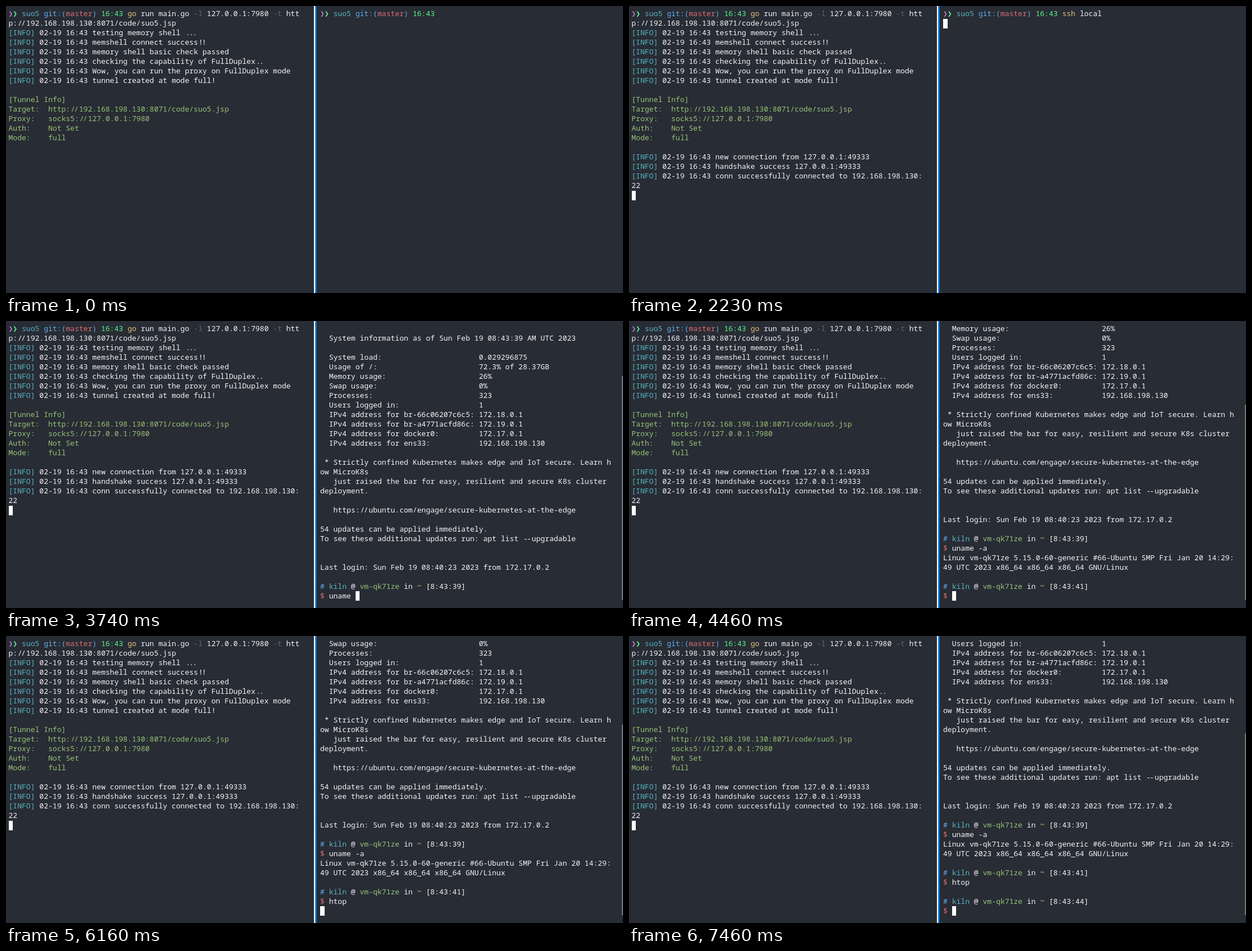
An HTML page with a canvas for the animation above (8000 ms loop, 1096 px wide and 511 px high).

```html
<!DOCTYPE html>
<html lang="en">
<head>
<meta charset="utf-8">
<title>Terminal tunnel</title>
<style>
  html, body { margin: 0; width: 100%; height: 100%; overflow: hidden; background: #282c34; }
  canvas { display: block; }
</style>
</head>
<body>
<canvas id="stage" width="1096" height="511"></canvas>
<script>
const ctx = document.getElementById('stage').getContext('2d');
const LOOP = 8000, CW = 7.83, RH = 16.98, TOP = 6, LEFT = 4.5, RIGHT = 558, ROWS = 29;
const BG = '#282c34';
// "^x" inside a string switches to colour x
const INK = {
  w: '#f4f5f7', c: '#56b6c2', g: '#98c379', G: '#5af78e', r: '#e06c75',
  b: '#61afef', y: '#e5c07b', p: '#c678dd', d: '#5c6370', k: BG
};

function box(x, row, col, n, color) {
  const left = Math.round(x + col * CW), top = Math.round(TOP + row * RH);
  ctx.fillStyle = color;
  ctx.fillRect(left, top, Math.round(x + (col + n) * CW) - left, Math.round(TOP + (row + 1) * RH) - top);
}

// Draws on the cell grid; repeated marks move together like ligatures. Returns the end column.
function put(x, row, text, col = 0) {
  const base = Math.round(TOP + row * RH + 12.3);
  let ink = 'w';
  for (const part of text.split(/(\^[a-zA-Z])/)) {
    if (part[0] === '^') { ink = part[1]; continue; }
    ctx.fillStyle = INK[ink];
    for (const run of part.match(/([.!\/-])\1+|[^]/g) || []) {
      const mid = (run.length - 1) / 2;
      for (let i = 0; i < run.length; i++, col++) {
        if (run[i] !== ' ') ctx.fillText(run[i], x + col * CW + (mid - i) * 1.8, base);
      }
    }
  }
  return col;
}

const PROMPT = '^p❯^G❯ ^csuo5 ^bgit:(^rmaster^b) ^G16:43 ';
const info = s => '^c[INFO] ^w02-19 16:43 ' + s;
const host = time => `^b# ^ckiln ^w@ ^gvm-qk71ze ^win ^y~ ^w[8:43:${time}]`;
const stat = (name, value) => '  ' + name.padEnd(34) + value;

const tunnel = [
  PROMPT + '^ygo ^wrun main.go ^d-l ^w127.0.0.1:7980 ^d-t ^whtt',
  'p://192.168.198.130:8071/code/suo5.jsp',
  info('testing memory shell ...'),
  info('memshell connect success!!'),
  info('memory shell basic check passed'),
  info('checking the capability of FullDuplex..'),
  info('Wow, you can run the proxy on FullDuplex mode'),
  info('tunnel created at mode full!'),
  '',
  '^g[Tunnel Info]',
  '^gTarget:  http://192.168.198.130:8071/code/suo5.jsp',
  '^gProxy:   socks5://127.0.0.1:7980',
  '^gAuth:    Not Set',
  '^gMode:    full'
];
const linked = [
  '',
  info('new connection from 127.0.0.1:49333'),
  info('handshake success 127.0.0.1:49333'),
  info('conn successfully connected to 192.168.198.130:'),
  '22'
];

const log = [
  '',
  '  System information as of Sun Feb 19 08:43:39 AM UTC 2023',
  '',
  stat('System load:', '0.029296875'),
  stat('Usage of /:', '72.3% of 28.37GB'),
  stat('Memory usage:', '26%'),
  stat('Swap usage:', '0%'),
  stat('Processes:', '323'),
  stat('Users logged in:', '1'),
  stat('IPv4 address for br-66c06207c6c5:', '172.18.0.1'),
  stat('IPv4 address for br-a4771acfd86c:', '172.19.0.1'),
  stat('IPv4 address for docker0:', '172.17.0.1'),
  stat('IPv4 address for ens33:', '192.168.198.130'),
  '',
  ' * Strictly confined Kubernetes makes edge and IoT secure. Learn h',
  'ow MicroK8s',
  '   just raised the bar for easy, resilient and secure K8s cluster',
  'deployment.',
  '',
  '   https://ubuntu.com/engage/secure-kubernetes-at-the-edge',
  '',
  '54 updates can be applied immediately.',
  'To see these additional updates run: apt list --upgradable',
  '', '',
  'Last login: Sun Feb 19 08:40:23 2023 from 172.17.0.2',
  '',
  host(39),
  '^r$ ^wuname -a',
  'Linux vm-qk71ze 5.15.0-60-generic #66-Ubuntu SMP Fri Jan 20 14:29:',
  '49 UTC 2023 x86_64 x86_64 x86_64 GNU/Linux',
  '',
  host(41),
  '^r$ ^whtop',
  '',
  host(44)
];

// pid, user, priority, nice, virt, res, shr, mem, time, thread mark
const tasks = `1 root 20 0 163M 13172 8248 0.3 0:09.27
572 root 19 -1 47876 18848 17680 0.5 0:03.46
617 root RT 0 346M 27360 9072 0.7 0:55.09
619 root 20 0 26528 7556 4744 0.2 0:03.24
621 root 20 0 346M 27360 9072 0.7 0:00.00 t
622 root RT 0 346M 27360 9072 0.7 0:00.00 t
623 root RT 0 346M 27360 9072 0.7 0:00.00 t
624 root RT 0 346M 27360 9072 0.7 0:00.60 t
625 root RT 0 346M 27360 9072 0.7 0:39.50 t
626 root RT 0 346M 27360 9072 0.7 0:00.00 t
799 systemd-t 20 0 89356 6528 5720 0.2 0:01.81
822 root 20 0 51128 11956 9940 0.3 0:00.05
826 root 20 0 307M 9416 7708 0.2 8:38.32
844 systemd-t 20 0 89356 6528 5720 0.2 0:00.22 t
870 root 20 0 307M 9416 7708 0.2 0:17.10 t
871 root 20 0 307M 9416 7708 0.2 0:00.00 t
879 root 20 0 307M 9416 7708 0.2 0:00.00 t
927 systemd-n 20 0 16244 8360 7316 0.2 0:01.97`.split('\n').map(s => s.split(' '));

function size(s, width) {
  const pad = s.padStart(width);
  return s.endsWith('M') ? '^c' + pad + '^w' : '^c' + pad.slice(0, -3) + '^w' + pad.slice(-3);
}

function taskLine([pid, user, pri, ni, virt, res, shr, mem, time, thread]) {
  return pid.padStart(7) + ' ^d' + user.padEnd(9) + '^w' + pri.padStart(4) +
    (ni < 0 ? '^r' : '^w') + ni.padStart(4) + '^w' +
    size(virt, 6) + size(res, 6) + size(shr, 6) + ' S  0.0  ' + mem + '  ' + time +
    (thread ? ' ^g/' : ' ^w/');
}

function monitor() {
  const x = RIGHT;
  for (let i = 0; i < 4; i++) {
    for (const [id, col] of [[i, 4], [i + 4, 35]]) {
      put(x, i + 1, `^c${id}^w[^d${'0.0%'.padStart(23)}^w]`, col);
    }
  }
  put(x, 5, '^cMem^w[^g|||||||^b||^y|||1.01G/3.80G^w]', 2);
  put(x, 6, '^cSwp^w[^r|^d' + '524K/3.80G'.padStart(22) + '^w]', 2);
  put(x, 5, '^cTasks: 93, ^g516 thr^c; ^g1^c runnin', 33);
  put(x, 6, '^cLoad average: ^w0.03 ^c0.03 0.03', 33);
  put(x, 7, '^cUptime: 3 days, 05:22:47', 33);

  box(x, 9, 0, 66, INK.g);
  box(x, 9, 46, 5, INK.c);
  put(x, 9, '^k    PID USER      PRI  NI  VIRT   RES   SHR S CPU%▽MEM%   TIME+  C');
  box(x, 10, 0, 66, INK.c);
  tasks.forEach((task, i) => {
    const line = taskLine(task);
    put(x, 10 + i, i ? line : '^k' + line.replace(/\^./g, ''));
  });

  ['Help', 'Setup', 'Search', 'Filter', 'Tree', 'SortBy', 'Nice -', 'Nice +'].forEach((name, i) => {
    box(x, 28, i * 8 + 2, 6, INK.c);
    put(x, 28, `F${i + 1}^k${name}`, i * 8);
  });
  put(x, 28, 'F9', 64);
}

function cursor(x, row, col, under = '') {
  box(x, row, col, 1, '#ffffff');
  put(x, row, '^k' + under, col);
}

// Local prompt with the suggested rest of the command behind the cursor
function local(typed) {
  const [cmd, ...rest] = typed.split(' ');
  const text = (cmd === 'ssh' ? '^y' : '^r') + cmd + (rest.length ? '^w ' + rest[0] : '');
  const ghost = typed ? 'ssh local'.slice(typed.length) : '';
  const col = put(RIGHT, 0, PROMPT + text);
  put(RIGHT, 0, '^d' + ghost.slice(1), col + 1);
  cursor(RIGHT, 0, col, ghost.slice(0, 1));
}

function waiting() {
  put(RIGHT, 0, PROMPT + '^yssh^w local');
  cursor(RIGHT, 1, 0);
}

// Remote session: the first lines of the log, then the line being edited
function remote(count, edit) {
  const top = Math.max(0, count + 1 - ROWS);
  log.slice(top, count).forEach((line, i) => put(RIGHT, i, line));
  cursor(RIGHT, count - top, put(RIGHT, count - top, edit));
  const thumb = 13606 / (34.1 + top);
  ctx.fillStyle = '#777b82';
  ctx.fillRect(1094, 497 - thumb, 2, thumb);
}

const type = s => () => local(s);
const shell = (count, s) => () => remote(count, '^r$ ^w' + s);
const bare = count => () => remote(count, '');

const steps = [
  [0, () => put(RIGHT, 0, PROMPT)],
  [100, type('')],
  [920, type('s')], [1010, type('ss')], [1110, type('ssh')],
  [1410, type('ssh ')], [1520, type('ssh l')], [1720, type('ssh lo')],
  [1810, type('ssh loc')], [1920, type('ssh loca')], [2030, type('ssh local')],
  [2230, waiting],
  [2630, bare(26)],
  [2730, shell(28, '')], [3130, shell(28, 'u')],
  [3330, shell(28, 'un')], [3430, shell(28, 'una')], [3540, shell(28, 'unam')],
  [3740, shell(28, 'uname ')], [4260, shell(28, 'uname -')], [4360, shell(28, 'uname -a')],
  [4460, shell(33, '')],
  [5760, shell(33, 'h')], [5870, shell(33, 'ht')], [5960, shell(33, 'htop')],
  [6160, bare(34)],
  [6270, monitor],
  [7360, bare(34)],
  [7460, shell(36, '')]
];

function draw([time, scene]) {
  ctx.fillStyle = BG;
  ctx.fillRect(0, 0, 1096, 511);
  ctx.font = '500 13.05px "Noto Sans Mono", "DejaVu Sans Mono", monospace';
  ctx.textBaseline = 'alphabetic';

  const lines = time < 2230 ? tunnel : [...tunnel, ...linked];
  lines.forEach((line, i) => put(LEFT, i, line));
  if (time >= 2230) cursor(LEFT, lines.length, 0);

  ctx.fillStyle = '#ffffff';
  ctx.fillRect(547, 0, 2, 511);
  ctx.fillStyle = '#0f84f0';
  ctx.fillRect(549, 0, 2.5, 511);
  scene();
}

let shown = null;
const start = performance.now();
function tick() {
  const t = (performance.now() - start) % LOOP;
  const step = steps.filter(s => s[0] <= t).pop();
  if (step !== shown) draw(shown = step);
  requestAnimationFrame(tick);
}
tick();
</script>
</body>
</html>
```
